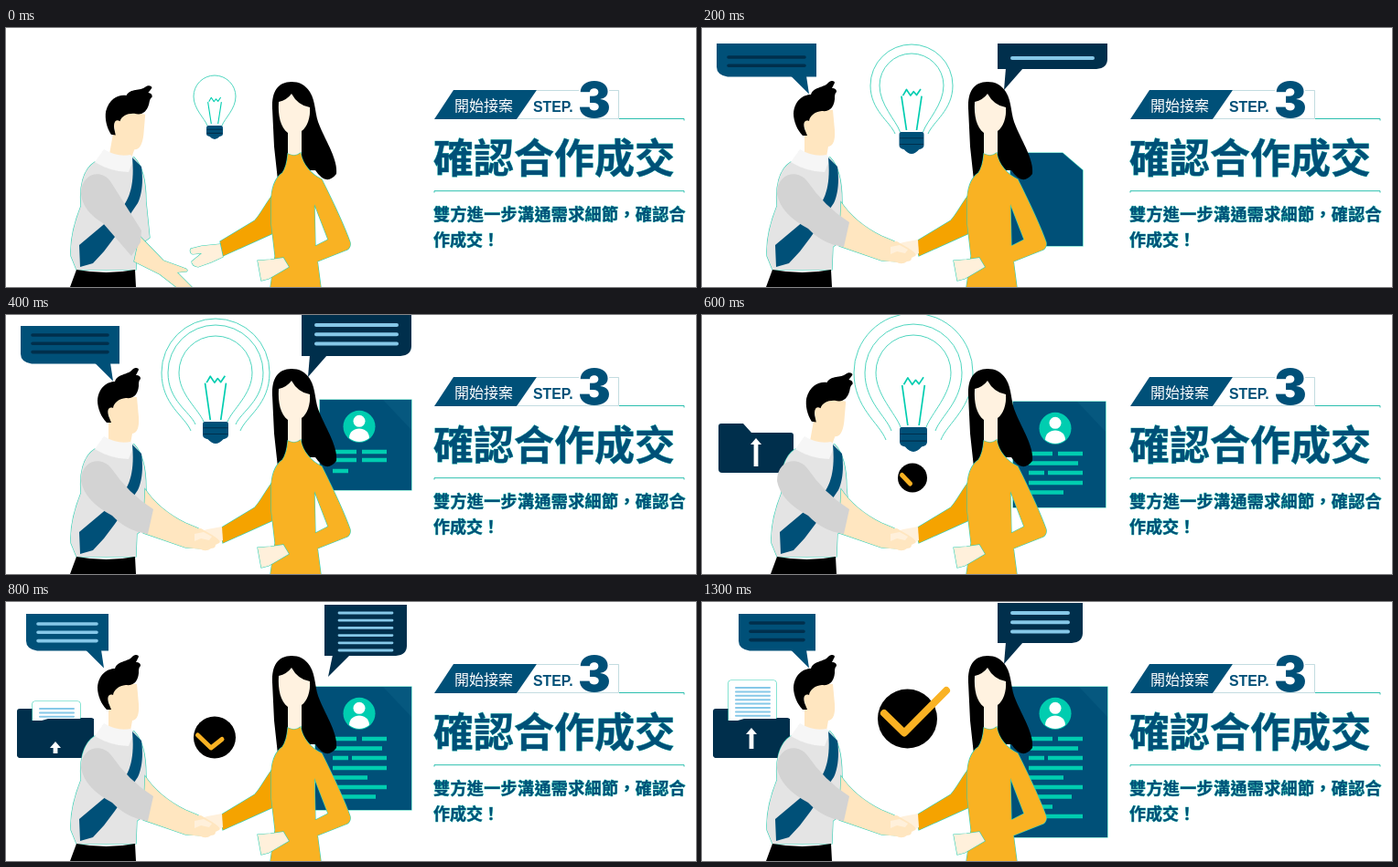
An HTML page that plays this animation: 754 px wide and 284 px high, repeating every 1.5 s.

```html
<!DOCTYPE html>
<html lang="zh-Hant">
<head>
<meta charset="utf-8">
<title>確認合作成交</title>
<style>
  html, body { margin: 0; width: 100%; height: 100%; overflow: hidden; background: #fff; }
  svg { display: block; width: 100%; height: 100%; }
  .cjk { font-family: "Noto Sans CJK TC", "Noto Sans CJK", sans-serif; }
  .edge { stroke: #35d0b4; stroke-width: 1.2; paint-order: stroke; }
  .fringe { stroke: #10b5a4; stroke-width: .7; paint-order: stroke; }
</style>
</head>
<body>
<svg viewBox="0 0 754 284" xmlns="http://www.w3.org/2000/svg">
  <g id="back"></g>

  <g id="man">
    <g id="head">
      <path fill="#ffe6c0" d="M115 90H143L145 112Q146 129 138 130L136 141V152L112 147V118L113 112C109 104 113 99 115 99Z"/>
      <path d="M100 94C101 79 111 73 119 73C122 64 133 66 138 60C141 57 145 58 145 60C144 62 143 64 142 66C145 66 147 67 147 70C145 72 145 74 145 78C144 88 139 92 131 91C123 92 118 96 117 102C111 100 110 106 113 113L115 118H110C104 112 100 102 100 94Z"/>
    </g>
    <path class="edge" fill="#e4e4e4" d="M97 147C84 155 80 175 82 195C74 215 70 235 71 250L77 265H142L143 240L157 230L153 190C153 168 149 151 140 142Z"/>
    <path fill="#f6f6f6" d="M107 133L97 147Q115 158 134 158L140 143L136 139Q122 142 107 133Z"/>
    <path fill="#005078" d="M138 142L148 152C150 166 149 182 144 192L119 229L107 245L95 258L81 262L80 238L118 206C134 193 141 175 138 142Z"/>
    <path d="M77 265Q110 271 141 265L142 284H70Z"/>
  </g>
  <g id="manArm"></g>

  <g id="woman">
    <path d="M312 59C297 59 290 70 291 88L293 130L297 167L312 156L338 156Q350 174 361 160C363 145 350 125 343 108C337 95 339 81 332 70C327 62 320 59 312 59Z"/>
    <path fill="#fff2e0" d="M298 81C297 96 300 109 308 115V143H323V113C329 109 333 98 332 87Q319 85 312 72Q307 79 298 81Z"/>
    <path class="edge" fill="#f5a300" d="M292 182C284 192 279 203 272 211L234 234L237 250L292 225Z"/>
    <path class="edge" fill="#f9b223" d="M308 138Q316 142 322 137C324 150 334 161 345 166C353 182 369 215 376 235Q377 240 373 243L310 268L303 257L352 232L337 193L338 238L344 284H289L294 250L290 215V185C291 172 296 163 302 159Q307 152 308 138Z"/>
    <path class="edge" fill="#fff0db" d="M275 255L289 254L303 252L309 262L287 275L279 277Z"/>
  </g>
  <g id="front"></g>

  <path fill="#005078" d="M489 68H580L558 100H468Z"/>
  <path fill="none" stroke="#a9cdd3" stroke-width=".7" d="M580 68.5H626M659 68.5H669.5V99.5H558"/>
  <path fill="none" stroke="#2bbfae" d="M670 99.5H741V101.5M468 180.5V178.7H741V180.5"/>
  <text class="cjk" x="490" y="91" font-size="16" font-weight="500" fill="#fff">開始接案</text>
  <g fill="#005078">
    <text x="576" y="92.3" font-size="15.8" font-weight="700" font-family="'Liberation Sans', Arial, sans-serif">STEP.</text>
    <text x="625" y="98.3" font-size="53.5" font-weight="900" font-family="Inter, sans-serif">3</text>
    <g class="cjk fringe" font-weight="700">
      <text x="467" y="158.8" font-size="44">確認合作成交</text>
      <text x="467" y="210.6" font-size="18" letter-spacing=".4">雙方進一步溝通需求細節，確認合</text>
      <text x="467" y="238.6" font-size="18">作成交！</text>
    </g>
  </g>
</svg>
<script>
const NAVY = '#005078', DARK = '#002f4c', TEAL = '#00cdb0', SKY = '#86c8e8', GOLD = '#f9b223';
const STEP = 200, LOOP = 1500;
const $ = id => document.getElementById(id);

const path = (d, fill, extra = '') => `<path d="${d}" fill="${fill}" ${extra}/>`;
const line = (d, color, w, cap = 'butt') =>
  path(d, 'none', `stroke="${color}" stroke-width="${w}" stroke-linecap="${cap}" stroke-linejoin="round"`);
const disc = (x, y, r, fill) => `<circle cx="${x}" cy="${y}" r="${r}" fill="${fill}"/>`;

// Evenly spaced horizontal strokes
function rules(x1, x2, y, n, gap, color, w) {
  let d = '';
  for (let i = 0; i < n; i++) d += `M${x1} ${y + i * gap}H${x2}`;
  return line(d, color, w, 'round');
}

function leftBubble({ x, y, r, n, y1, tip, color }) {
  const b = 53.5;
  return path(`M${tip - 20} ${b - 1}L${tip} ${b + 19}L${tip - 3} ${b - 1}Z`, NAVY) +
    path(`M${x} ${y}H${r}V${b}H${x + 12}Q${x} ${b - 2} ${x} ${b - 11}Z`, NAVY) +
    rules(x + 13, r - 13, y1, n, 9.3, color, 3.6);
}

function rightBubble({ x, y, r, b, n, y1, gap, tip }) {
  return path(`M${x + 9} ${b - 1}L${tip} ${b + 23}L${x + 28} ${b - 1}Z`, DARK) +
    path(`M${x} ${y}H${r}V${b - 11}Q${r} ${b - 1} ${r - 12} ${b}H${x}Z`, DARK) +
    rules(x + 16, r - 16, y1, n, gap, SKY, n > 3 ? 2.8 : 4);
}

// Round top narrowing to a neck of half width h at y
function globe(cx, cy, r, h, y) {
  const k = cy + r * .6, m = y - (y - cy) * .25, e = h + (r - h) * .2;
  return line(`M${cx - h} ${y}C${cx - e} ${m} ${cx - r} ${k} ${cx - r} ${cy}` +
    `A${r} ${r} 0 0 1 ${cx + r} ${cy}C${cx + r} ${k} ${cx + e} ${m} ${cx + h} ${y}`, '#4fd6bf', 1);
}

function bulb({ cx, cy, r, h, y, rings, fil, tall }) {
  const w = h * .82, low = y - 2, at = (u, v) => `${cx + u * w} ${fil + v * w}`;
  let s = globe(cx, cy, r, h - 1, y);
  for (const [rr, hh, yy] of rings) s += globe(cx, cy, rr, hh, yy);
  s += line(`M${at(-1, .15)}L${cx - w * .5} ${low}M${at(1, .15)}L${cx + w * .5} ${low}` +
    `M${at(-.85, .1)}L${at(-.5, -.5)}L${at(-.1, .1)}L${at(.2, -.3)}L${at(.5, .05)}L${at(.9, -.55)}`, TEAL, h > 10 ? 1.7 : 1.1);
  s += path(`M${cx - h + 2} ${y}H${cx + h - 2}Q${cx + h} ${y} ${cx + h} ${y + 3}V${y + tall * .6}` +
    `Q${cx + h} ${y + tall * .75} ${cx + h * .6} ${y + tall * .8}Q${cx} ${y + tall * 1.2} ${cx - h * .6} ${y + tall * .8}` +
    `Q${cx - h} ${y + tall * .75} ${cx - h} ${y + tall * .6}V${y + 3}Q${cx - h} ${y} ${cx - h + 2} ${y}Z`, NAVY);
  return s + rules(cx - h + 1, cx + h - 1, y + tall * .28, 2, tall * .28, DARK, 1.1);
}

function badge({ x, y, r, d, w }) {
  return disc(x, y, r, '#000') + line(d, GOLD, w, 'round');
}

function arrow(x, top, bottom) {
  return path(`M${x} ${top}L${x + 6} ${top + 7}H${x + 2.4}V${bottom}H${x - 2.4}V${top + 7}H${x - 6}Z`, '#fff');
}

function folder({ x, y, w, h, paper, n, up }) {
  const r = x + w, b = y + h;
  let s = path(`M${x} ${y + 3}Q${x} ${y} ${x + 3} ${y}H${x + 27}L${x + 36} ${y + 10}H${r - 3}` +
    `Q${r} ${y + 10} ${r} ${y + 13}V${b - 4}Q${r} ${b} ${r - 4} ${b}H${x + 4}Q${x} ${b} ${x} ${b - 4}Z`, DARK);
  if (paper) {
    s += path(`M29 ${paper + 3}Q29 ${paper} 32 ${paper}H78Q81 ${paper} 81 ${paper + 3}V132H29Z`, '#fff', 'class="edge"') +
      rules(37, 74, paper + 8, n, 4.4, SKY, 2) +
      path(`M${x} ${y + 13}H${x + 27}L${x + 34} ${y + 11}H${r}V${b - 4}Q${r} ${b} ${r - 4} ${b}H${x + 4}Q${x} ${b} ${x} ${b - 4}Z`, DARK);
  }
  return s + arrow(x + w / 2, ...up);
}

const ROWS = [
  'M357 150H383M389 150H416', 'M357 160.5H411', 'M357 171H374M378 171H416', 'M357 182H416',
  'M357 192.5H395', 'M357 203H416', 'M357 213.5H404', 'M357 224.5H383', 'M357 235H416'
];

function card({ x, y, r, b, rows }) {
  let d = ROWS.slice(0, rows).join('');
  if (rows === 3) d = 'M357 150H383M389 150H416M350 159H383M389 159H416M357 171H374';
  return path(`M${x} ${y}H${r}V${b}H${x}Z`, NAVY, 'class="edge"') +
    path(`M${r - 31} ${y}H${r}V${y + 33}Z`, '#06587f') +
    `<g transform="translate(0 ${y - 93})">` + disc(386, 122.3, 17.5, TEAL) + disc(386, 116.3, 6.5, '#fff') +
    path('M375 135C375 121 397 121 397 135Q386 143 375 135Z', '#fff') + line(d, TEAL, 4.4) + '</g>';
}

const sheet = 'M350 137H394L416 156V239H337V137Z';

const ARM_DOWN =
  path('M146 228L172 255L194 263Q200 265 197 267L187 268L203 284H186L168 270L140 256Z', '#ffe6c0', 'class="edge"') +
  path('M82 182C82 159 104 154 114 168L148 222L147 235L137 250L106 214Q84 201 82 182Z', '#d3d3d3');
const ARM_OUT =
  path('M152 191C162 206 178 219 196 228L208 233L222 240L214 256L196 255L150 239Z', '#ffe6c0', 'class="edge"') +
  path('M82 182C82 159 104 154 115 168Q134 196 161 213L155 240Q132 237 116 220Q86 204 82 182Z', '#d3d3d3');
const HAND_OPEN =
  path('M234 237L214 239L202 242Q200 246 204 248L214 247L203 256Q203 261 210 262L224 257L237 251Z', '#fff0db', 'class="edge"');
const HAND_SHAKE =
  path('M236 232L220 235L207 239L205 247L222 255L237 247Z', '#fff0db') +
  path('M202 234L213 234L225 241Q236 248 233 250L229 252Q229 256 224 256Q219 260 213 257L198 255Z', '#ffe6c0') +
  path('M206 240L216 238L225 243L222 247L213 245L206 248Z', '#fff0db');

const speech = (x, y, r, n, y1, tip = 117, color = DARK) => leftBubble({ x, y, r, n, y1, tip, color });

const poses = [
  { open: true, tilt: 10, back: () =>
      bulb({ cx: 228, cy: 75, r: 23, h: 9, y: 107, rings: [], fil: 80, tall: 15 }) },
  { back: () => path(sheet, NAVY, 'class="edge"') + speech(16, 17, 125, 2, 32) +
      rightBubble({ x: 323, y: 17, r: 443, b: 45, n: 1, y1: 33, gap: 9, tip: 330 }) +
      bulb({ cx: 229, cy: 63, r: 35, h: 13.5, y: 114, rings: [[45, 18, 116]], fil: 73, tall: 24 }) },
  { back: () => card({ x: 343, y: 93, r: 443, b: 192, rows: 3 }) + speech(16, 12, 124, 3, 22) +
      rightBubble({ x: 323, y: 0, r: 443, b: 45, n: 3, y1: 11, gap: 10.2, tip: 330 }) +
      bulb({ cx: 229, cy: 63, r: 40, h: 14, y: 117, rings: [[52, 22, 120], [59, 27, 127]], fil: 73, tall: 24 }) },
  { tilt: 10, shift: 5, back: () => card({ x: 340, y: 95, r: 441, b: 211, rows: 5 }) +
      folder({ x: 18, y: 119, w: 82, h: 54, up: [135, 166] }) +
      bulb({ cx: 231, cy: 63, r: 41, h: 15, y: 123, rings: [[53, 24, 127], [65, 30, 137]], fil: 75, tall: 27 }) +
      badge({ x: 230, y: 178.5, r: 16, d: 'M218.5 175.5L227.5 185', w: 5 }) },
  { back: () => card({ x: 338, y: 93, r: 443, b: 228, rows: 7 }) + speech(22, 13, 112, 3, 24, 107, SKY) +
      rightBubble({ x: 348, y: 3, r: 438, b: 59, n: 6, y1: 12, gap: 8.2, tip: 352 }) +
      folder({ x: 12, y: 117, w: 84, h: 54, paper: 109, n: 3, up: [153, 166] }) +
      badge({ x: 228, y: 148.5, r: 23, d: 'M209.5 146L224 160L236 150.5', w: 5 }) },
  { back: () => card({ x: 337, y: 93, r: 443, b: 258, rows: 9 }) + speech(40, 13, 124, 3, 23) +
      rightBubble({ x: 323, y: 1, r: 416, b: 45, n: 3, y1: 12, gap: 10.2, tip: 330 }) +
      folder({ x: 12, y: 117, w: 84, h: 54, paper: 86, n: 8, up: [138, 161] }) +
      badge({ x: 224.5, y: 128, r: 32.5, d: 'M199 122L221 143.5L267 97', w: 8 }) }
];

let shown = -1;
function draw(ms) {
  const i = Math.min(poses.length - 1, Math.floor(ms % LOOP / STEP));
  if (i === shown) return;
  shown = i;
  const { open, tilt = 0, shift = 0, back } = poses[i];
  $('back').innerHTML = back();
  $('head').setAttribute('transform', `rotate(${tilt} 120 145)`);
  $('man').setAttribute('transform', `translate(${shift})`);
  $('manArm').innerHTML = open ? ARM_DOWN : ARM_OUT;
  $('front').innerHTML = open ? HAND_OPEN : HAND_SHAKE;
}

const start = performance.now();
function tick() {
  draw(performance.now() - start);
  requestAnimationFrame(tick);
}
tick();
</script>
</body>
</html>
```
